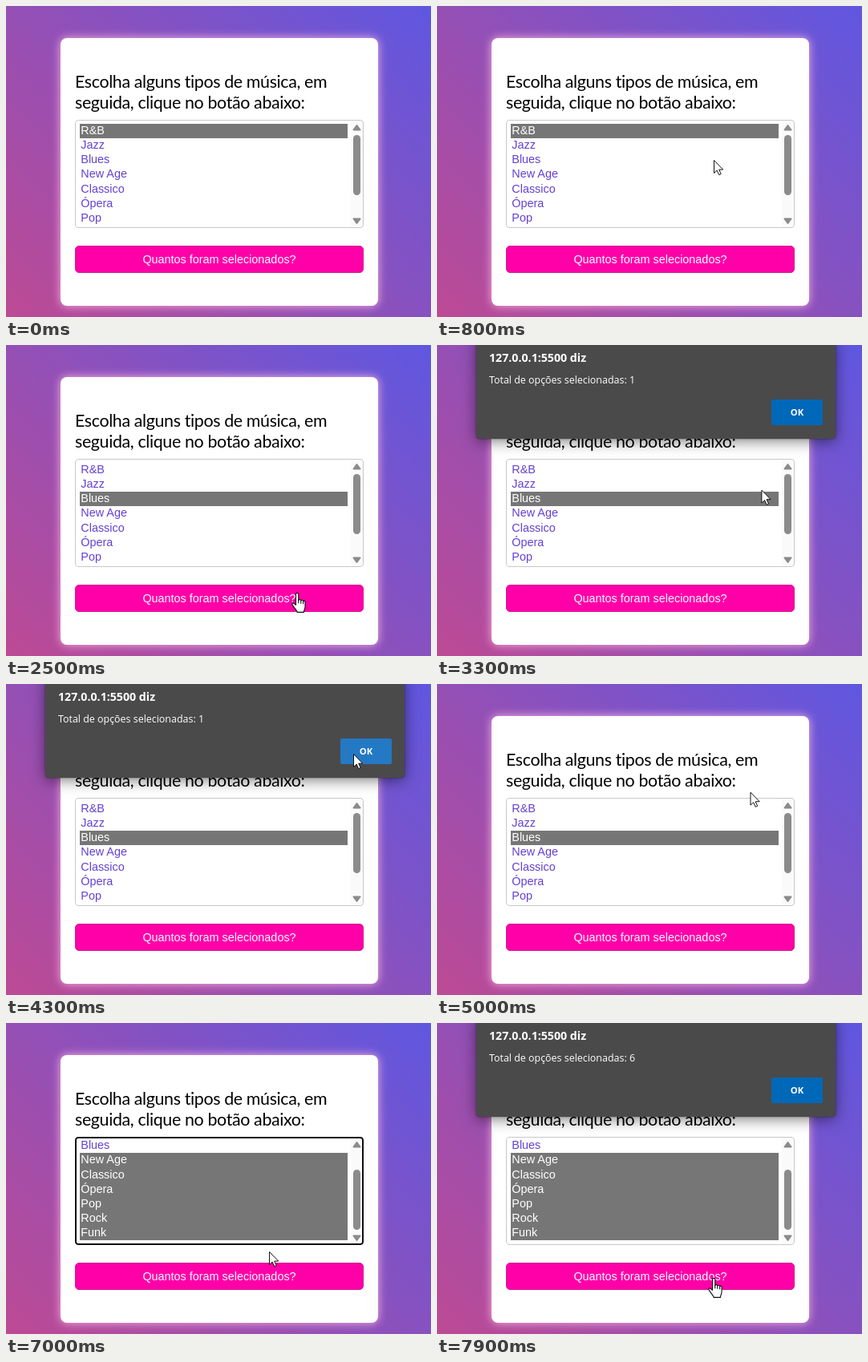
An HTML page that plays this animation: 530x388 px, repeating every 8000 ms.

```html
<!DOCTYPE html>
<html lang="pt">
<head>
<meta charset="utf-8">
<title>Seleção de músicas</title>
<style>
  html, body { margin: 0; width: 100%; height: 100%; overflow: hidden; }
  body { position: relative; background: linear-gradient(45deg, #bd4a94, #5f57e0); }
  div, svg { position: absolute; box-sizing: border-box; white-space: nowrap; }
  #card { left: 68px; top: 40px; width: 396px; height: 334px; border-radius: 8px;
    background: #fff; box-shadow: 0 0 12px #f9b4e2; }
  #title { left: 86px; top: 81px; font: 21.4px/26px Lato, sans-serif; letter-spacing: -.36px; color: #000; }
  #list { left: 86px; top: 142px; width: 360px; height: 135px; border-radius: 4px;
    background: #fff; overflow: hidden; font: 14.4px/18.2px "Liberation Sans", Arial, sans-serif; }
  #rows { left: 6px; width: 334px; }
  #rows div { left: 0; width: 334px; height: 18.3px; padding-left: 1.3px; color: #6540d2; }
  #rows span { position: relative; top: -.8px; }
  #rows .on { background: #767676; color: #fff; }
  #bar { left: 344px; top: 0; width: 16px; height: 135px; background: #fafafa; }
  #thumb { left: 347px; width: 9px; height: 75px; border-radius: 4.5px; background: #8b8b8b; }
  #frame { inset: 0; border: 1px solid #c8c8c8; border-radius: 4px; }
  #frame.focus { border: 2px solid #101010; }
  #button { left: 86px; top: 299px; width: 360px; height: 34px; border-radius: 5px; background: #ff00a8;
    border: 1px solid #d4148f; color: #fff; text-align: center;
    font: 14.4px/32px "Liberation Sans", Arial, sans-serif; }
  #dialog { left: 49px; top: -10px; width: 448px; height: 127px; border-radius: 4px; background: #4a4a4a;
    color: #fff; box-shadow: 0 3px 18px rgba(0,0,0,.5), 0 0 2px rgba(0,0,0,.5);
    font: 12.45px/20px "Open Sans", "Noto Sans", sans-serif; }
  #host { left: 16px; top: 15.6px; font-size: 14.2px; font-weight: 700; }
  #msg { left: 16px; top: 44.3px; }
  #ok { left: 368px; top: 78px; width: 64px; height: 32px; border-radius: 2px; background: #0068b8;
    text-align: center; font-size: 11.3px; line-height: 32px; font-weight: 700; }
  #ok.hover { background: #2379c4; }
  svg { left: 0; top: 0; overflow: visible; fill: #fff; stroke: #111; stroke-linejoin: round; }
  #arrows { fill: #8b8b8b; stroke: #8b8b8b; stroke-width: 2; }
</style>
</head>
<body>
<div id="card"></div>
<div id="title">Escolha alguns tipos de música, em<br>seguida, clique no botão abaixo:</div>
<div id="list">
  <div id="rows"></div>
  <div id="bar"></div>
  <div id="thumb"></div>
  <svg id="arrows" width="360" height="135"><path d="M351.5 7l4 5.5h-8zM351.5 129l4-5.5h-8z"/></svg>
  <div id="frame"></div>
</div>
<div id="button">Quantos foram selecionados?</div>
<div id="dialog">
  <div id="host">127.0.0.1:5500 diz</div>
  <div id="msg"></div>
  <div id="ok">OK</div>
</div>
<svg id="arrow" width="14" height="21"><path d="M.5.5v16l3.7-3.4 2.5 5.6 2.5-1.1-2.5-5.5h5z"/></svg>
<svg id="hand" width="18.7" height="26.4" viewBox="0 0 17 24">
  <path d="M5 1.8c0-2 3-2 3 0v7c0-1.5 2.7-1.5 2.7.3 0-1 2.6-1 2.6.6 0-.8 2.2-.8 2.2 1v5c0 3-1.5 4-1.5 6.5H6.5c0-2-4.5-6-5.5-8.5-.7-1.8 1-2.6 2.2-1.2L5 14z"/>
  <path d="M8 8v4M10.7 9v3.5M13.3 10v3" fill="none"/>
</svg>
<script>
const $ = id => document.getElementById(id);
const LOOP = 8000, STEP = 100, ROW = 18.2, TOP = 146.5, MAX_SCROLL = 39;
const clamp = (v, a, b) => Math.min(b, Math.max(a, v));
const within = (t, a, b) => t >= a && t < b;
const show = (id, on) => $(id).style.display = on ? "" : "none";

const rows = ["R&B", "Jazz", "Blues", "New Age", "Classico", "Ópera", "Pop", "Rock", "Funk"].map((name, i) => {
  const row = document.createElement("div");
  row.appendChild(document.createElement("span")).textContent = name;
  row.style.top = i * ROW + "px";
  return $("rows").appendChild(row);
});

// Pointer stops: time, x, y
const path = [
  [0, 492, 400], [100, 486, 390], [800, 345, 192], [1000, 345, 192], [1500, 342, 256],
  [2200, 363, 310], [2800, 363, 310], [3700, 434, 88], [4300, 433, 87], [4700, 433, 87],
  [5400, 325, 208], [5500, 325, 208], [5900, 327, 235], [6400, 328, 285],
  [7100, 328, 285], [7600, 345, 319], [8000, 345, 319]
];

function pointerAt(t) {
  const i = path.findIndex(p => p[0] > t);
  const [t0, x0, y0] = path[i - 1], [t1, x1, y1] = path[i];
  let k = (t - t0) / (t1 - t0);
  k *= k * (3 - 2 * k);
  return [x0 + (x1 - x0) * k, y0 + (y1 - y0) * k];
}

function selection(t, scroll) {
  if (t < 900) return [0, 0];
  if (t < 5500) return [2, 2];
  const y = pointerAt(Math.min(t, 7100))[1];
  return [3, clamp(Math.floor((y - TOP + scroll) / ROW), 3, 8)];
}

function draw(t) {
  const [x, y] = pointerAt(t);
  const scroll = MAX_SCROLL * clamp((t - 6350) / 300, 0, 1);
  const [first, last] = selection(t, scroll);
  rows.forEach((row, i) => row.className = i >= first && i <= last ? "on" : "");
  $("rows").style.top = TOP - 142 - scroll + "px";
  $("thumb").style.top = 19 + 22 * scroll / MAX_SCROLL + "px";
  $("frame").className = within(t, 900, 2400) || within(t, 5500, 7700) ? "focus" : "";

  show("dialog", within(t, 2600, 4700) || t >= 7800);
  $("msg").textContent = "Total de opções selecionadas: " + (last - first + 1);
  $("ok").className = within(x, 417, 481) && within(y, 68, 100) ? "hover" : "";

  const onButton = within(x, 86, 446) && within(y, 299, 333);
  show("hand", onButton);
  show("arrow", !onButton);
  $("hand").style.transform = `translate(${x - 7}px, ${y - 1}px)`;
  $("arrow").style.transform = `translate(${x}px, ${y}px)`;
}

const start = performance.now();
function tick() {
  const t = (performance.now() - start) % LOOP;
  draw(Math.floor(t / STEP) * STEP);
  requestAnimationFrame(tick);
}
tick();
</script>
</body>
</html>
```
